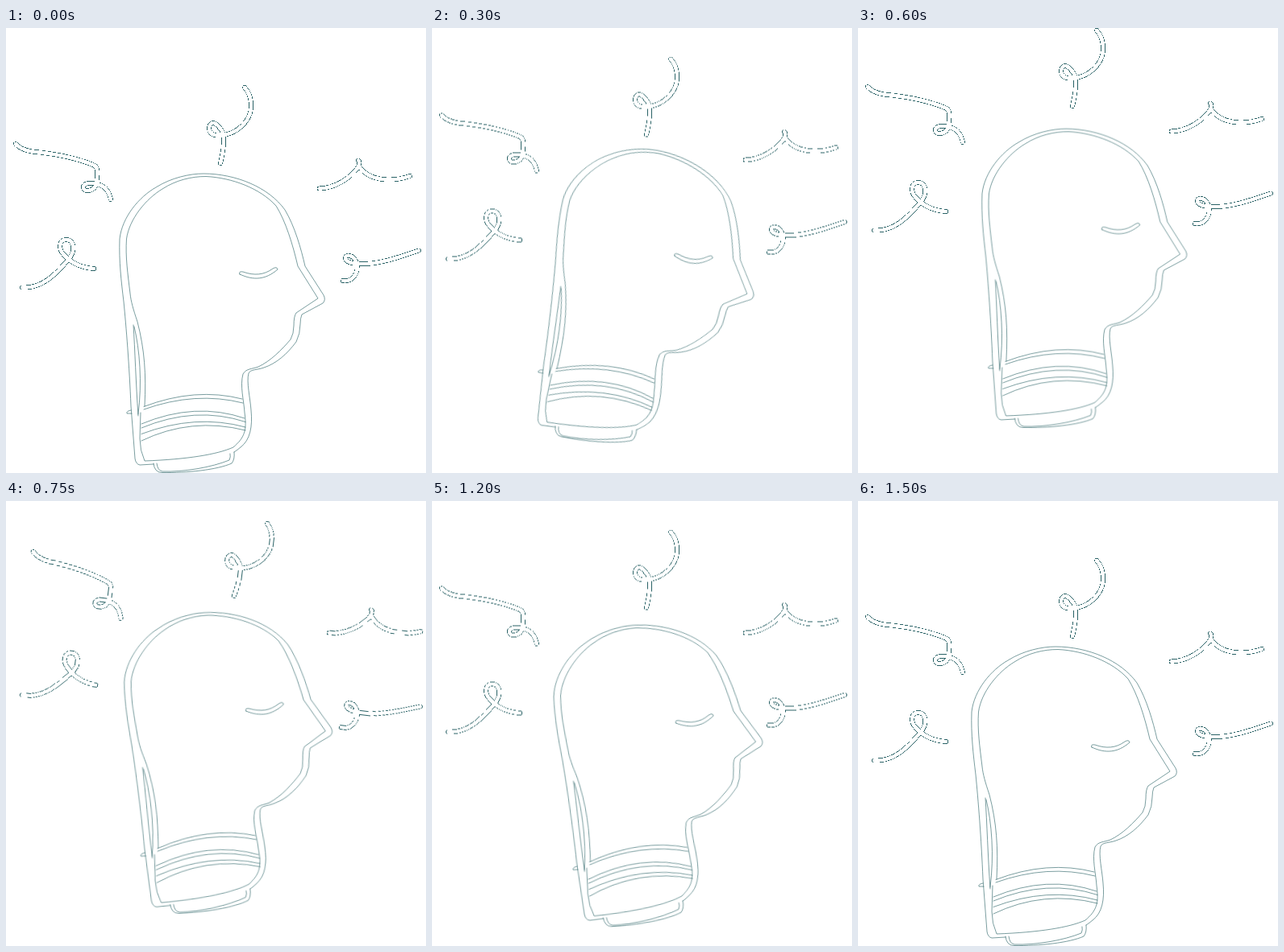
These frames come from a looping animation (521x553 px, 1.65 s). An HTML page:

```html
<!DOCTYPE html>
<html lang="en">
<head>
<meta charset="utf-8">
<title>Thinking head</title>
<style>
  html, body { margin: 0; width: 100%; height: 100%; overflow: hidden; background: #fff; }
  svg { display: block; width: 521px; height: 553px; }
  /* hard pixel edges give the thin, slightly broken ink line */
  path { fill: none; stroke-linecap: round; stroke-linejoin: round; shape-rendering: crispEdges; }

  .head { stroke: #2a6266; stroke-width: .62px; transform-origin: 279px 438.5px; animation: nod 1650ms step-end infinite; }
  .curls { transform-origin: 262px 208.5px; animation: sway 1650ms step-end infinite; }
  .edge { stroke: #2a6266; stroke-width: 5.8px; }
  .core { stroke: #fff; stroke-width: 4.6px; }

  @keyframes nod {
    0%       { transform: none; }
    9.0909%  { transform: translate(11px, -13px) rotate(-2deg); }
    18.1818% { transform: translate(-13px, -27px) rotate(10.5deg); }
    27.2727% { transform: translate(20px, -55px) rotate(3.7deg); }
    36.3636% { transform: translate(12px, -55.5px) rotate(.3deg); }
    45.4545% { transform: translate(15px, -44.5px) rotate(-3.1deg); }
    54.5454% { transform: translate(8.5px, -58.5px) rotate(.6deg); }
    63.6363% { transform: translate(20px, -55px) rotate(3.7deg); }
    72.7272% { transform: translate(22px, -29.5px) rotate(-4deg); }
    81.8181% { transform: translate(11px, -13px) rotate(-2deg); }
    90.9090%, 100% { transform: none; }
  }
  @keyframes sway {
    0%       { transform: none; }
    9.0909%, 81.8181%  { transform: translate(0, -19px) rotate(-4deg); }
    18.1818%, 72.7272% { transform: translate(0, -35.5px); }
    27.2727%, 63.6363% { transform: translate(-1px, -60.5px) rotate(-13.9deg); }
    36.3636%, 54.5454% { transform: translate(0, -71px); }
    45.4545% { transform: translate(12px, -51px) rotate(7deg); }
    90.9090%, 100% { transform: none; }
  }
</style>
</head>
<body>
<svg viewBox="0 0 521 553">
  <defs>
    <g id="curl">
      <path d="M12 144Q18 151 32 153.500C60 156 88 162 108 170C116 173 113 184 112 194C110 202 98 205 96 199C95 192 106 192 113 194C122 196 128 203 130 213"/>
      <path d="M20 322.500C45 324 62 306 78 287C87 276 84 263 75 263C65 263 65 275 72 282C82 293 95 298 109 299"/>
      <path d="M296 74C304 82 308 100 299 114C290 128 275 134 262 133.500C251 133 250 123 255 118.500C260 116 268 126 270 133C271 147 268 160 266 168"/>
      <path d="M388.500 199.500C410 199 428 185 436 174Q440 167 437 164.500M438 172C450 190 478 192 501 184"/>
      <path d="M418 314C430 316 438 304 435 292C431 281 421 281 421 286C422 293 435 293 445 293C465 293 490 284 512 276.500"/>
    </g>
  </defs>

  <g class="curls">
    <use href="#curl" class="edge"/>
    <use href="#curl" class="core"/>
  </g>

  <g class="head">
    <!-- skull, face and neck -->
    <path d="M183 542L166 543Q161 542 160 535L155 470C153 420 149 370 146 340C143 315 140 290 141 262C144 235 165 210 186 198C205 186 228 181 245 181C285 181 326 198 346 226C358 246 366 274 371 296L394 332Q397 338 393 342L367 356Q365 361 365 368Q365 380 360 390C348 406 335 417 320 422C312 425 303 424 301 429C298 440 303 460 304 475C306 495 303 512 291 521Q285 526 283 527"/>
    <path d="M172 470C174 430 172 400 163 365C158 350 155 340 154 330C151 305 148 285 149.500 262C153 237 174 212 194 200C211 189 230 184.500 248 184.500C280 186 315 199 335 221C347 240 356 270 362 296L387 336L360 354Q357 358 357 370Q357 380 353 387C342 400 328 414 313 421C305 424 298 423 294 430C290 445 295 462 296 478C299 500 296 509 282 521C262 530 225 536 172 538Q166 525 166 510L167 478"/>
    <!-- hair -->
    <path d="M158 369C160 400 161 440 164 482M159 371C166 400 169 440 164 480M155 475Q149 476 150 479L156 479"/>
    <!-- bands -->
    <path d="M171 470.500Q235 446 293 461M171 474Q235 451 294 466M168 492Q235 464 296 485M168 497Q235 469 297 489.500M168 504.500Q235 479 297 496M168 513Q230 483 297 500"/>
    <!-- base -->
    <path d="M183 541Q184 552 193 552.500C225 553 262 549 280 541Q284 536 283 527M187 541Q188 550 194 551C220 552 255 546 277 537Q279 533 278 529"/>
    <!-- eye -->
    <path d="M290 306Q288 302 294 303C308 308 320 307 331 299Q336 296 337 300C322 313 307 314 290 306Z"/>
  </g>
</svg>
</body>
</html>
```
